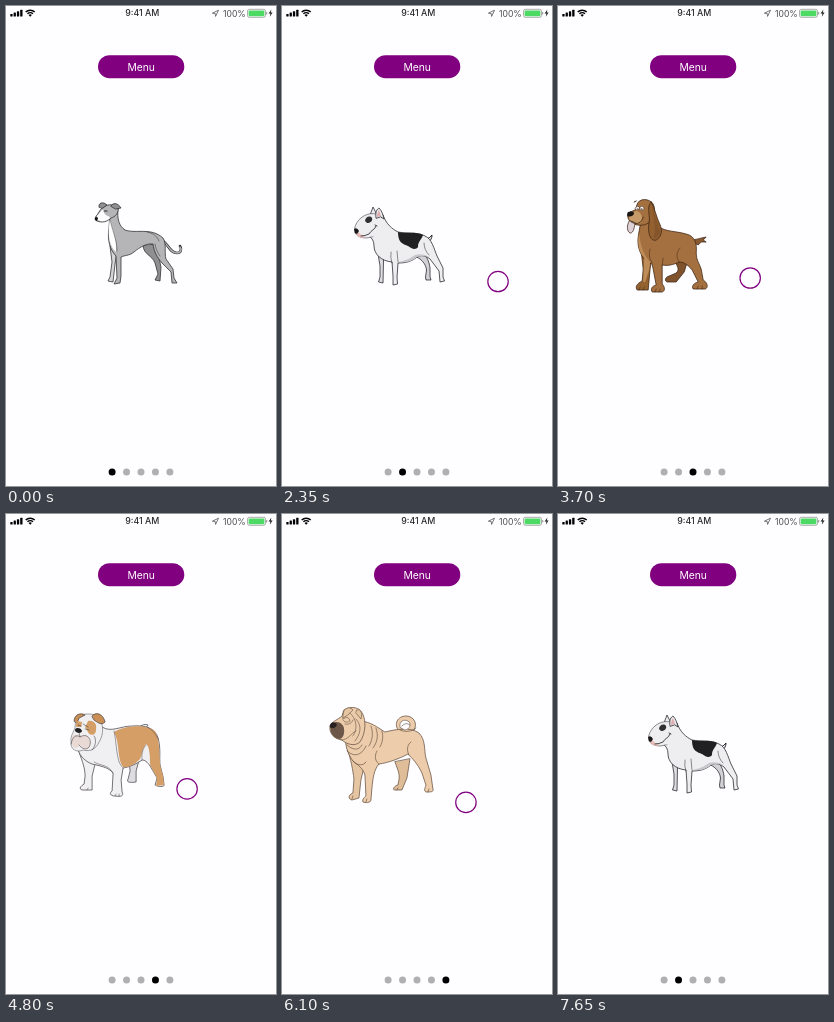
An HTML page with a canvas that plays this animation: 270 by 480 pixels, repeating every 8000 ms.

```html
<!DOCTYPE html>
<html lang="en">
<head>
<meta charset="utf-8">
<title>Dog pager</title>
<style>
html, body { margin: 0; width: 100%; height: 100%; overflow: hidden; background: #fefdff; }
canvas { display: block; width: 270px; height: 480px; }
</style>
</head>
<body>
<canvas id="stage"></canvas>
<script>
const W = 270, H = 480, LOOP = 8000, SETTLE = 370;
const PURPLE = '#800080', PAPER = '#fefdff';
const canvas = document.getElementById('stage');
const ctx = canvas.getContext('2d');
const ratio = window.devicePixelRatio || 1;
canvas.width = W * ratio;
canvas.height = H * ratio;

// Each swipe: touch from (x0, y0) to (x1, y1), then the page settles by itself
const swipes = [
  { start: 800, release: 1220, x0: 222, y0: 270, x1: 48, y1: 314 },
  { start: 2200, release: 2850, x0: 234, y0: 272, x1: 19, y1: 314 },
  { start: 3550, release: 4050, x0: 217, y0: 266, x1: 27, y1: 312 },
  { start: 4650, release: 5150, x0: 205, y0: 269, x1: 22, y1: 314 },
  { start: 6000, release: 6260, x0: 220, y0: 283, x1: 40, y1: 310 },
  { start: 7100, release: 7270, x0: 218, y0: 276, x1: 44, y1: 312 }
];

// A part is [path, fill, line width, line colour]
const line = (d, width = 0.7, color) => [d, null, width, color];
const patch = (d, fill) => [d, fill, 0];

const greyhound = { dx: 0, ink: '#2b2b2d', parts: [
  line('M156 234C163 239 164 247 171 247C175 247 176 243 174 240', 2.6),
  line('M156 234C163 239 164 247 171 247C175 247 176 243 174 241', 1.4, '#b5b4b6'),
  ['M137 240C138 249 146 249 149 257L152 268L149 274L154 275L155 261C153 252 153 248 152 238Z', '#8f8e91'],
  ['M104 240L106 256L104 271L102 275L107 276L109 258L111 246Z', '#d5d4d6'],
  ['M112 203C111 213 113 220 119 224C130 228 145 221 157 232C161 238 158 247 160 253L167 263L168 272L171 277L166 277L165 266L156 257C151 251 148 246 147 238C141 237 134 241 128 246C123 250 119 249 115 251L115 270L114 277L108 278L111 272L110 250C104 244 101 234 103 222L104 207Z', '#b5b4b6'],
  patch('M104 210C105 221 112 233 110 246C104 241 102 231 103 221Z', '#fff'),
  line('M104 212C105 222 111 232 111 245M149 238C150 244 152 247 154 250M141 226C147 227 151 230 153 235', 0.5),
  ['M95 203C99 198 108 197 112 202C113 207 109 211 105 212C101 216 96 217 91 215C88 214 89 211 91 209Z', '#b5b4b6'],
  patch('M98 204C97 210 103 209 104 212C100 216 95 216 92 214L91 210L96 204Z', '#fff'),
  ['M93 201C92 197 97 195 101 199L97 202Z', '#8f8e91'],
  ['M105 200C107 196 112 197 115 202L110 203Z', '#8f8e91'],
  patch('M89 212Q90 210 92 212L91 215L89 214Z', '#151515'),
  line('M98 205L101 205', 1.1)
] };

const terrier = { dx: 0, ink: '#202024', parts: [
  line('M161 233Q166 233 168 229Q168 234 164 236', 1),
  ['M150 250C157 252 162 258 162.5 264L161.5 271L162 274L167 274L166 271L166 262C165 254 162 251 160 246Z', '#d2d1d5'],
  ['M114 248L116 260L116 271L114.5 276L119 277L119.5 254Z', '#dddce0'],
  ['M106 209L109 201L113 209Z', '#eeedf0'],
  ['M119 209C122 218 128 223 134 226C144 228 154 226 161 230C168 233 170 243 173 250L179 262L179 271L180.5 275L176 276L175 265L166 253C161 249 157 249 153 251C147 256 141 257 134 257L133 271L133.5 278L129 279L129 270L128 256C117 255 110 248 110 240C110 235 108 232 105 230L111 212Z', '#eeedf0'],
  patch('M134 226C143 228 152 225 159 229C157 235 154 235 154 241C151 245 147 242 144 240C140 238 134 238 134 226Z', '#202022'),
  patch('M151 249C157 247 163 249 166 252C161 249 157 250 153 251C147 256 141 257 135 256C143 254 147 252 151 249Z', '#c7c6cb'),
  line('M127 246Q126 252 128 257M133 245L134 256M160 237Q160 244 165 249', 0.5),
  ['M112 208C104 206 97 211 94 215C91 219 90 223 91 227C94 232 102 233 107 231C111 231 114 225 114 219L118 211Z', '#eeedf0', 0.5],
  patch('M110 214L118 212L121 220L114 231L106 230Z', '#eeedf0'),
  patch('M92 225C95 226 97 230 102 231C98 233 94 231 92 228Z', '#e9bcb8'),
  ['M112 212C111 206 113 203 115 202C118 205 119 209 120 213L117 211Z', '#eeedf0'],
  patch('M113 211C113 207 114 205 115 204L117 210Z', '#dfaeb0'),
  patch('M101 215C101 211 106 209 108 212C109 215 106 217 103 217Z', '#303033'),
  patch('M90 223Q93 221 95 225L93 228L91 227Z', '#171717'),
  line('M112 220C111 224 107 224 105 228Q101 230 97 230M111 219L113 220', 0.8)
] };

const spaniel = { dx: 25, ink: '#3b2414', parts: [
  ['M132 234C138 234 142 232 148 231L145 234L148 236L143 236L140 239L136 237Z', '#8a5a30'],
  ['M116 253C119 261 122 263 118 267L111 270C107 271 106 275 109 276L118 276L126 266L130 253Z', '#80532d'],
  ['M83 245L85 263L84 275C78 278 77 281 79 284L90 284L92 262L94 252Z', '#93622f'],
  ['M101 221C108 226 118 225 128 228C137 230 139 238 138 247C138 254 141 257 143 263L145 274C150 277 150 282 147 283L135 283C133 280 136 277 140 276L134 264C129 258 125 256 121 256C115 259 109 260 104 259L104 278C107 281 107 285 104 286L94 286C92 283 94 280 98 279L94 258C87 257 81 247 80 239C79 232 81 226 82 219L94 209Z', '#a5703f'],
  patch('M81 227C82 240 86 250 92 256L91 264L87 276L85 276L86 252C80 245 79 236 81 227Z', '#be8c58'),
  line('M94 257C90 251 91 246 92 243M104 259L105 252M121 256C117 250 119 245 122 242M81 284L82 281M85 284L86 281M97 286L98 283M101 286L102 283M139 283L140 280M144 283L144 280', 0.5),
  ['M79 198C81 192 91 192 95 198C98 204 96 213 90 217C86 220 78 220 74 217C69 214 68 208 72 206L77 204Z', '#a5703f'],
  patch('M78 205C83 206 86 212 82 217C78 219 73 217 71 213L71 208Z', '#c79b69'),
  ['M71 215C68 220 69 226 72 227C76 227 76 220 77 217Z', '#ddd0d7'],
  line('M73 216C79 220 84 216 85 211', 0.8),
  ['M93 196C97 203 98 211 102 219C105 226 102 232 98 234C92 236 89 226 91 216C92 207 88 201 93 196Z', '#94602f'],
  patch('M94 201C97 210 100 220 102 226C100 232 96 234 95 231C99 224 95 212 94 201Z', '#85552b'),
  patch('M69 208C69 205 74 205 76 207C75 211 71 211 69 210Z', '#1b1715'),
  ['M77 202Q79 199 82 202Q80 205 78 204Z', '#fff', 0.5],
  ['M82 201Q85 199 86 203Q84 205 82 204Z', '#fff', 0.5],
  line('M76 196L78 195M79 203L80 203M83 203L84 203', 1)
] };

const bulldog = { dx: 24, ink: '#4a4648', parts: [
  ['M132 214C136 210 140 210 142 211L138 216Z', '#f0eff2'],
  ['M123 248L124 257L122 265C120 268 123 269 130 268L130 257L133 246Z', '#dddce0'],
  ['M73 238C76 247 79 254 79 262L78 270C73 273 73 276 77 276L86 276L86 262L90 246Z', '#f0eff2'],
  ['M96 213C105 219 114 212 126 212C139 211 149 214 152 224C155 235 153 244 154 251L157 263L158 271C158 273 152 273 149 271L151 264L144 252C141 248 139 246 136 246C130 250 124 253 117 254L115 266L116 278C118 282 115 283 109 282C104 282 103 279 106 277L107 259C102 253 94 252 86 250C78 247 72 240 72 234L88 216Z', '#f0eff2'],
  patch('M108 218C119 211 141 210 149 217C154 226 153 241 154 251L157 263L158 271L150 272L151 264L144 251C144 240 143 232 140 230C136 234 136 241 134 245C128 251 122 254 117 253C111 246 114 230 108 218Z', '#d49e66'),
  line('M108 217C110 227 110 236 112 244C113 250 116 253 117 254M136 246C135 239 137 234 140 231M88 248C94 252 102 250 107 259M152 225Q148 216 141 213M81 276L82 274M109 282L110 280M113 282L113 280', 0.5),
  ['M73 202C78 199 89 199 94 204C97 211 98 220 93 228C90 235 84 238 77 236C70 239 64 235 65 228C64 221 68 218 69 213C69 208 70 205 73 202Z', '#f0eff2', 0.5],
  ['M68 207C68 201 74 198 79 201L73 204L71 209Z', '#c98f55'],
  ['M86 202C90 197 97 200 99 208C95 212 91 208 88 206Z', '#c98f55'],
  patch('M82 207C87 206 91 209 90 215C90 220 87 222 83 220L79 213Z', '#d49e66'),
  patch('M70 207L76 208L75 213L70 213Z', '#d49e66'),
  patch('M66 222C69 219 72 221 75 222C82 219 86 226 83 233C81 237 77 234 74 231C71 236 66 234 66 230Z', '#e8d9d5'),
  patch('M69 215C71 213 75 214 76 217C75 220 70 219 69 217Z', '#202022'),
  line('M73 219L74 223C70 220 66 223 65 230M74 223C81 218 87 226 83 233C80 237 75 234 73 231M77 210L82 213M79 215L83 216M72 211L75 212M88 222C91 226 89 233 86 236', 0.6)
] };

const sharPei = { dx: 37, ink: '#665242', parts: [
  ['M112 248C115 256 117 260 116 266L115 271C111 272 109 276 112 276L119 276L124 264L127 245Z', '#dfbd99'],
  ['M64 233C68 246 70 256 71 265L70 279C65 281 65 285 69 286L76 284L78 266L82 249Z', '#e6c5a2'],
  ['M116 217C110 210 115 202 123 202C131 202 135 210 131 216L124 220Z', '#ecccab'],
  ['M78 207C88 208 94 213 102 218C114 215 128 213 136 219C143 226 141 236 143 244L148 261L150 275C151 278 148 278 143 278C140 276 143 273 143 271L139 259C135 250 129 244 125 240C118 244 105 249 96 250C91 256 90 264 89 274L88 286C88 289 82 289 80 288C79 285 82 283 83 282L82 261C80 254 75 251 70 247C64 239 63 231 62 225Z', '#ecccab'],
  ['M117 213C116 207 121 205 125 207C129 209 127 216 122 216Z', PAPER, 0.6],
  line('M119 212C123 208 125 210 127 211M117 216C123 219 130 217 133 214M126 241C123 235 125 230 128 228M96 250C91 246 92 241 94 237M64 231C72 238 77 235 79 231M64 237C73 245 80 239 83 232M88 212C91 220 89 227 86 232M93 214C96 222 94 229 90 234M99 217C101 223 99 230 97 233M70 247C74 252 81 252 83 248M83 288L84 285M145 278L146 275M69 285L70 282M114 276L115 274', 0.65),
  ['M61 196C66 192 75 193 78 197C84 205 83 219 77 228C72 233 63 230 59 226C51 225 46 219 47 212C49 207 55 206 59 202Z', '#ecccab'],
  ['M61 197C63 193 68 193 70 196L65 201L60 204Z', '#e6c5a2', 0.6],
  ['M74 196C78 194 80 200 78 205L73 199Z', '#e6c5a2', 0.6],
  patch('M48 211C53 205 60 209 61 214C62 220 60 225 56 225C50 224 46 218 48 211Z', '#6c5748'),
  patch('M47 211C49 207 53 208 54 211C52 215 48 215 47 213Z', '#272120'),
  line('M60 205C64 202 67 204 67 207C64 209 61 208 60 206M62 210C66 211 69 209 70 206M67 199C74 205 75 215 70 222M73 205C80 212 77 221 72 227M58 226C66 226 68 219 73 217M52 214C53 219 57 222 60 220', 0.6)
] };

const dogs = [greyhound, terrier, spaniel, bulldog, sharPei];
for (const dog of dogs) {
  for (const part of dog.parts) part[0] = new Path2D(part[0]);
}

function drawDog(dog, x) {
  ctx.save();
  ctx.translate(x + dog.dx, 0);
  ctx.lineJoin = ctx.lineCap = 'round';
  for (const [path, fill, width = 0.75, color = dog.ink] of dog.parts) {
    if (fill) {
      ctx.fillStyle = fill;
      ctx.fill(path);
    }
    if (width) {
      ctx.lineWidth = width;
      ctx.strokeStyle = color;
      ctx.stroke(path);
    }
  }
  ctx.restore();
}

function box(x, y, w, h, r, color) {
  ctx.beginPath();
  ctx.roundRect(x, y, w, h, r);
  ctx.fillStyle = color;
  ctx.fill();
}

function circle(x, y, r) {
  ctx.beginPath();
  ctx.arc(x, y, r, 0, Math.PI * 2);
}

function text(s, x, y, size, weight, color) {
  ctx.font = `${weight} ${size}px Inter, Roboto, sans-serif`;
  ctx.textAlign = 'center';
  ctx.textBaseline = 'alphabetic';
  ctx.fillStyle = color;
  ctx.fillText(s, x, y);
}

const arrow = new Path2D('M206.4 7.2L212.5 4.2L209.6 10.4L209.2 7.5Z');
const bolt = new Path2D('M265.4 3.5L262.6 7.6H264.4L263.8 10.8L266.6 6.6H264.8Z');

function drawStatus() {
  for (let i = 0; i < 4; i++) {
    const h = 2.6 + i * 1.4;
    box(4.3 + i * 3.3, 10.6 - h, 2.3, h, 0.5, '#000');
  }
  ctx.strokeStyle = '#000';
  ctx.lineWidth = 1.4;
  ctx.lineCap = 'butt';
  for (const r of [3.9, 6.4]) {
    ctx.beginPath();
    ctx.arc(24.2, 10.6, r, -Math.PI * 0.75, -Math.PI * 0.25);
    ctx.stroke();
  }
  ctx.beginPath();
  ctx.moveTo(24.2, 10.8);
  ctx.arc(24.2, 10.8, 2.4, -Math.PI * 0.75, -Math.PI * 0.25);
  ctx.fillStyle = '#000';
  ctx.fill();

  text('9:41 AM', 136.2, 10.4, 8.8, 500, '#2a2a2a');
  text('100%', 228.4, 10.5, 8.6, 400, '#4a4a4a');
  ctx.strokeStyle = '#555';
  ctx.lineWidth = 0.8;
  ctx.stroke(arrow);
  ctx.beginPath();
  ctx.roundRect(241.5, 3.3, 18, 8, 1.8);
  ctx.strokeStyle = '#8a8a8a';
  ctx.lineWidth = 0.7;
  ctx.stroke();
  box(242.6, 4.4, 15.8, 5.8, 1, '#4cd964');
  box(260.2, 6, 1, 2.6, 0.5, '#8a8a8a');
  ctx.fillStyle = '#222';
  ctx.fill(bolt);
}

const drag = (s, t) => Math.min(1, (t - s.start) / (s.release - s.start)) ** 1.7;

// Share of a whole page that a swipe has moved
function progress(s, t) {
  if (t <= s.start) return 0;
  const pulled = (s.x0 - s.x1) * drag(s, t) / W;
  if (t <= s.release) return pulled;
  const left = Math.max(0, 1 - (t - s.release) / SETTLE);
  return 1 - (1 - pulled) * left ** 3;
}

function drawTouch(s, t) {
  const fade = 1 - Math.max(0, t - s.release) / 200;
  if (t < s.start || fade <= 0) return;
  const u = drag(s, t);
  ctx.globalAlpha = fade;
  circle(s.x0 + (s.x1 - s.x0) * u, s.y0 + (s.y1 - s.y0) * u, 10.2);
  ctx.strokeStyle = t > s.release ? '#a49bb4' : PURPLE;
  ctx.lineWidth = 1.2;
  ctx.stroke();
  ctx.globalAlpha = 1;
}

function render(t) {
  ctx.setTransform(ratio, 0, 0, ratio, 0, 0);
  ctx.fillStyle = PAPER;
  ctx.fillRect(0, 0, W, H);

  const scroll = swipes.reduce((sum, s) => sum + progress(s, t), 0);
  const first = Math.floor(scroll);
  for (const page of [first, first + 1]) {
    drawDog(dogs[page % dogs.length], (page - scroll) * W);
  }

  drawStatus();
  box(92, 49.2, 86.3, 23, 11.5, PURPLE);
  text('Menu', 135.2, 64.6, 10.3, 400, '#fff');

  const current = swipes.filter(s => t >= s.release + SETTLE).length % dogs.length;
  for (let i = 0; i < dogs.length; i++) {
    circle(106.1 + i * 14.45, 466, 3.5);
    ctx.fillStyle = i === current ? '#000' : '#b0afb1';
    ctx.fill();
  }
  for (const s of swipes) drawTouch(s, t);
}

const begin = performance.now();
function tick() {
  render((performance.now() - begin) % LOOP);
  requestAnimationFrame(tick);
}
tick();
</script>
</body>
</html>
```
